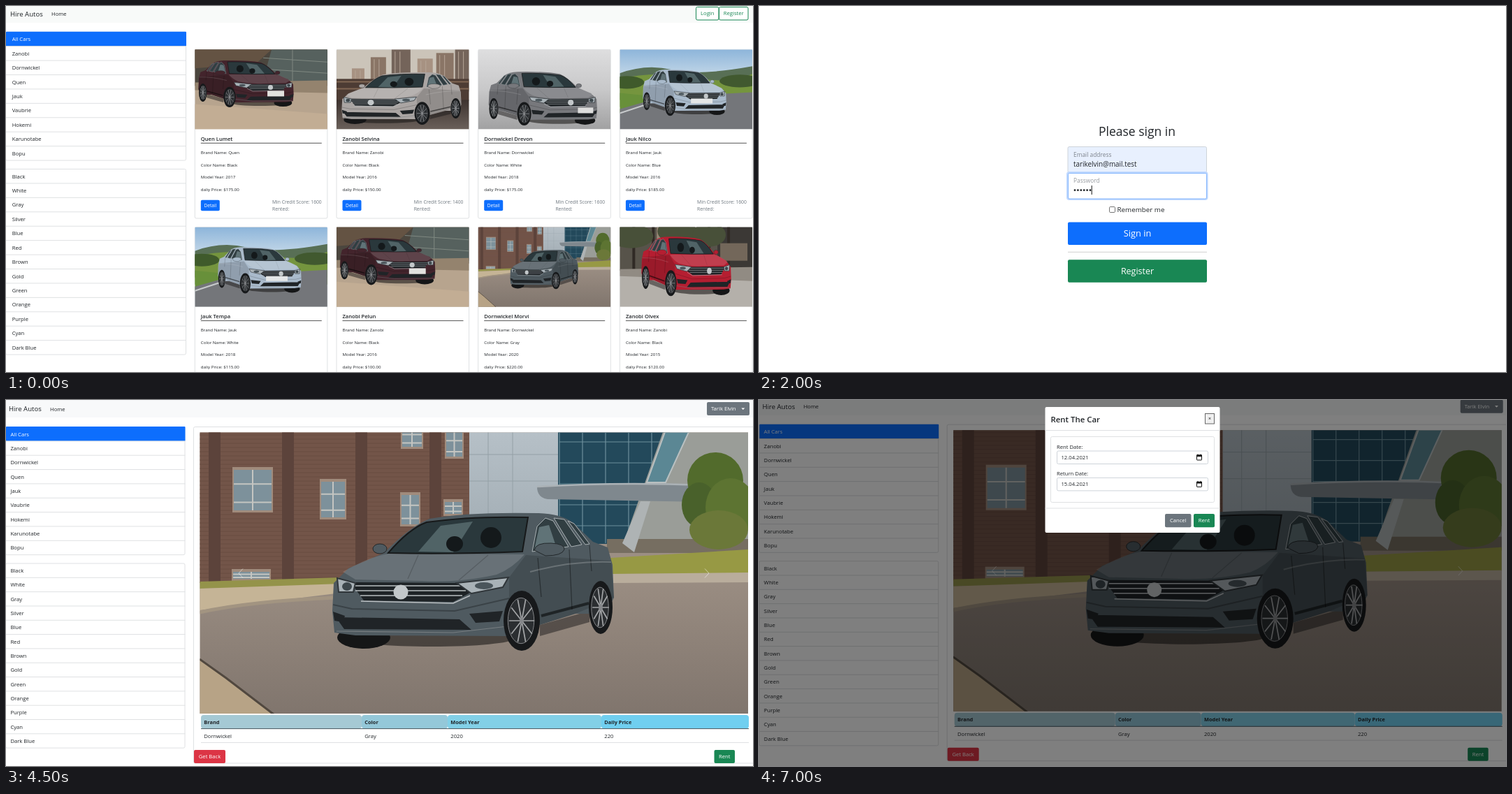
An HTML page for the animation above (8000 ms loop, 1069 by 524 pixels).

```html
<!DOCTYPE html>
<html lang="en">
<head>
<meta charset="utf-8">
<title>Car rental</title>
<style>
html, body { margin: 0; width: 100%; height: 100%; overflow: hidden; background: #fff; }
#stage { display: block; width: 1069px; height: 524px; }
text { font-family: "Open Sans", "Noto Sans", sans-serif; white-space: pre; }
</style>
</head>
<body>
<svg id="stage" viewBox="0 0 1069 524"></svg>
<script>
const INK = '#212529', BLUE = '#0d6efd', GREEN = '#198754', GRAY = '#6c757d', RED = '#dc3545', LINE = '#dfe1e3';
const BODY = 7.65;

const rect = (x, y, w, h, fill, r = 0, stroke = 'none') =>
  `<rect x="${x}" y="${y}" width="${w}" height="${h}" rx="${r}" fill="${fill}" stroke="${stroke}"/>`;
const text = (x, y, s, size = BODY, fill = INK, weight = 400, anchor = 'start') =>
  `<text x="${x}" y="${y}" font-size="${size}" fill="${fill}" font-weight="${weight}" text-anchor="${anchor}">${s}</text>`;
const poly = (points, fill, more = '') => `<polygon points="${points}" fill="${fill}" ${more}/>`;
const path = (d, stroke, width = 1, fill = 'none') =>
  `<path d="${d}" stroke="${stroke}" stroke-width="${width}" fill="${fill}"/>`;
const shape = (d, fill) => path(d, 'none', 0, fill);
const oval = (x, y, rx, ry, fill, more = '') =>
  `<ellipse cx="${x}" cy="${y}" rx="${rx}" ry="${ry}" fill="${fill}" ${more}/>`;
const rule = (x1, x2, y, color = LINE) => path(`M${x1} ${y}H${x2}`, color);
const button = (x, y, w, h, label, fill, size = BODY) =>
  rect(x, y, w, h, fill, 2) + text(x + w / 2, y + h / 2 + size * .36, label, size, '#fff', 400, 'middle');
const outline = (x, y, w, h, label) =>
  rect(x, y, w, h, '#fff', 2, GREEN) + text(x + w / 2, y + h / 2 + 2.7, label, BODY, GREEN, 400, 'middle');
const gradient = (id, ...colors) => `<linearGradient id="${id}" x2="0" y2="1">` +
  colors.map((c, i) => `<stop offset="${i / (colors.length - 1)}" stop-color="${c}"/>`).join('') + '</linearGradient>';

// ---- Pictures ----
function wheel(x, y, rx, ry) {
  let spokes = '';
  for (let i = 0; i < 10; i++) {
    const a = i * Math.PI / 5;
    spokes += `M${x} ${y}L${x + rx * .7 * Math.cos(a)} ${y + ry * .74 * Math.sin(a)}`;
  }
  return oval(x, y, rx, ry, '#17191b') +
    oval(x - 1, y, rx * .72, ry * .76, '#2b2e31', 'stroke="#85878a"') +
    path(spokes, '#a3a5a7', 1.7) + oval(x, y, 3, 5, '#85878a');
}

const carShape = oval(610, 342, 115, 11, '#1d1b1a', 'opacity=".6"') +
  poly('764,322 835,302 835,318 764,338', '#1d1b1a', 'opacity=".5"') +
  oval(512, 340, 38, 16, '#151617') +
  shape('M470 333L467 302L469 262L490 241L541 219Q578 181 606 170Q660 160 762 162Q795 163 812 176L840 203L861 211L868 236L870 283L858 306L815 306L764 322L720 338L500 337Z', 'currentColor') +
  shape('M482 246Q520 224 548 220L742 221Q725 241 702 250Q650 262 595 259L500 257Z', '#ffffff24') +
  path('M590 222L575 256M690 222L648 258', '#0000002a', 1.5) +
  shape('M720 254L744 222L866 230L870 283L815 306L764 322L720 338Z', '#00000026') +
  path('M547 219Q577 184 602 175Q665 166 747 168L739 217Q640 221 547 219Z', '#17191a', 2, '#2a383c') +
  poly('590,217 622,180 668,174 640,218', '#7f989a', 'opacity=".45"') +
  oval(694, 197, 15, 15, '#14191b') + oval(642, 206, 12, 11, '#14191b') +
  path('M753 217L760 181L772 169L783 173L805 210ZM784 169L799 171L824 207L809 210ZM804 173L813 177L835 206L829 207Z', '#a9b0b3', 1, '#313e42') +
  poly('756,214 763,182 777,179 788,212', '#8fa7ac', 'opacity=".5"') +
  oval(535, 213, 10, 7, 'currentColor', 'stroke="#22272a"') +
  path('M756 215Q758 204 780 205Q800 206 799 214Q796 223 772 223Z', '#22272a', 1, 'currentColor') +
  path('M761 226L766 282M806 214L810 300M835 208L838 245', '#00000066', 1.2) +
  path('M750 246Q810 230 866 232', '#ffffff33', 2) + path('M766 309L834 291', '#00000088', 4) +
  shape('M493 261L655 262L664 276L640 289L512 287Z', '#1e2326') +
  path('M497 266H650M500 273H658M507 280H653M508 288L640 291L664 280', '#b9bec1', 1.5) +
  path('M474 255L500 262L497 275L476 275ZM645 262L719 254L711 268L666 277Z', '#30363a', 2, '#a9b2b7') +
  oval(488, 267, 7, 6, '#3d474c') + oval(684, 266, 13, 5, '#4a555b') +
  path('M468 293L495 299L642 302L720 284', '#00000044', 2) +
  shape('M472 311L649 314L666 329L484 328ZM663 306L711 302L706 317L672 319ZM468 303L485 309L482 318L470 316Z', '#202427') +
  path('M473 331L640 333L718 324', '#777d80', 1.2) +
  oval(565, 275, 10.5, 10.5, '#c3c8ca') +
  wheel(738, 316, 26, 43) + wheel(851, 297, 17, 38);

const car = (color, x, y, w, h, flip) =>
  `<g color="${color}" transform="translate(${flip ? x + w : x} ${y}) scale(${(flip ? -w : w) / 404} ${h / 200}) translate(-466 -160)"><use href="#car"/></g>`;

function brickWindow([x, y, w, h]) {
  return rect(x - 2, y - 4, w + 4, h + 7, '#a08b7c') + rect(x, y, w, h, '#7d919b') +
    path(`M${x + w / 2} ${y}v${h}M${x} ${y + h * .35}h${w}M${x} ${y + h * .8}h${w}`, '#c4c5c1', 2);
}

function campus() {
  let bricks = '', panes = '';
  for (let y = 50; y < 256; y += 6) bricks += `M277 ${y}H662`;
  for (let x = 792; x < 945; x += 33) panes += `M${x} 46V205`;
  for (let y = 60; y < 205; y += 30) panes += `M792 ${y}H945`;
  return rect(277, 46, 786, 404, 'url(#asphalt)') +
    rect(277, 46, 386, 216, '#735549') + path(bricks, '#684c41', 1) +
    [290, 395, 500, 606].map(x => rect(x, 46, 17, 214, '#5c433b')).join('') +
    [[326, 100, 54, 58], [451, 117, 34, 51], [566, 136, 25, 42], [628, 146, 24, 17], [567, 40, 28, 27], [630, 46, 23, 35], [325, 246, 52, 10]].map(brickWindow).join('') +
    rect(663, 46, 130, 170, 'url(#metal)') + path('M690 46V165M725 46V165M663 78H790M663 116H790', '#94a0a6') +
    rect(790, 46, 160, 160, '#23495b') + path(panes, '#6d8f9c', 1.2) +
    poly('940,46 1063,46 1063,215 880,215', '#9a9d98') + poly('917,118 943,46 977,46 944,118', '#5b8794', 'stroke="#b9c0c1" stroke-width="2"') +
    rect(860, 199, 203, 20, '#766e61') + poly('882,205 908,145 922,145 899,218', '#aeb3b4') +
    shape('M760 124Q880 117 992 121Q1001 124 1000 146L775 142Q760 140 760 124Z', '#7f888e') + path('M760 124Q880 117 998 122', '#abb2b6', 2.5) +
    rect(1011, 145, 4, 67, '#4b4233') +
    [[1015, 115, 40, 40], [992, 150, 25, 32], [1037, 154, 36, 42], [1020, 186, 42, 28]].map(([x, y, a, b], i) => oval(x, y, a, b, ['#526b2c', '#49612b', '#5d7432', '#6b7839'][i])).join('') +
    poly('865,226 1063,214 1063,248 865,249', '#979944') + poly('277,260 480,254 480,265 277,270', '#94934a') +
    poly('277,270 480,263 480,276 277,301', '#c5b496') + poly('868,249 1063,247 1063,261 868,262', '#b9ad9c') +
    path('M277 304Q350 288 470 283', '#a29481', 5) +
    poly('277,371 315,398 383,450 277,450', '#b7a386') + path('M277 371L315 398L383 450', '#51483f', 3) +
    car('#4f5a60', 466, 160, 404, 200);
}

const focus = () => rect(0, 0, 190, 114, '#b7a48e') + rect(0, 0, 190, 52, '#4b463e') +
  poly('0,0 110,0 88,20 0,27', '#645343') + poly('110,0 190,0 190,48 98,43', '#56615e') +
  path('M98 12L190 18M98 28L190 34M140 0V45', '#7f8881', 1) + poly('0,47 190,44 190,62 0,58', '#94836e') +
  poly('0,78 190,92 190,114 0,114', '#c2ad94') +
  car('#43242c', 5, 15, 137, 68, true) + rect(104, 59, 24, 8, '#e2e2df');

const corolla = () => rect(0, 0, 190, 114, '#cbc4b9') +
  [[22, 27, 18], [49, 11, 22], [79, 0, 27], [116, 13, 22], [143, 5, 25], [170, 0, 20]].map(([x, y, w], i) =>
    rect(x, y, w, 60, ['#a79282', '#8a7566', '#74645a'][i % 3]) + path(`M${x + 5} ${y + 3}V58M${x + 12} ${y + 3}V58`, '#b5a596', 1)).join('') +
  rect(0, 42, 190, 31, '#4d3c34') + path('M0 46H190M0 56H190', '#806653', 2) +
  rect(0, 72, 190, 42, 'url(#street)') + car('#aaa5a3', 7, 32, 172, 76);

const passat = () => rect(0, 0, 190, 114, 'url(#studio)') + car('#77787c', 15, 31, 156, 78, true) + rect(143, 83, 22, 8, '#dddddc');

const astra = () => rect(0, 0, 190, 114, 'url(#sky)') +
  shape('M0 34Q38 20 75 29T190 24V72H0Z', '#586f55') + shape('M0 42Q50 30 105 40T190 35V82H0Z', '#75953e') +
  oval(10, 47, 25, 9, '#3f5a2b') + oval(172, 45, 29, 9, '#41592f') +
  poly('0,62 70,69 0,91', '#68903a') + poly('0,85 60,68 190,61 190,114 0,114', '#74767a') +
  path('M0 91L64 70', '#c8cbcc', 2) + car('#a9bacb', 33, 28, 120, 67, true) + rect(102, 70, 31, 7, '#e4e6e7');

const auris = () => rect(0, 0, 190, 114, '#b4b0aa') + rect(0, 0, 190, 62, '#57534a') +
  rect(53, 0, 47, 47, '#978775') + rect(140, 0, 50, 61, '#3b3835') +
  path('M20 0V60M48 0V57M128 0V52M156 0V62', '#302a25', 4) +
  [[16, 13, 32], [82, 6, 28], [128, 11, 24]].map(([x, y, r]) => oval(x, y, r, 17, '#485039')).join('') +
  rect(144, 23, 39, 25, '#73675a') + poly('0,60 190,57 190,77 0,70', '#918b83') +
  car('#b51e31', 31, 13, 129, 86, true);

const picture = (id, x, y, w, h) =>
  `<svg x="${x}" y="${y}" width="${w}" height="${h}" viewBox="${id === 'campus' ? '277.5 46.5 784.5 402.5' : '0 0 190 114'}" preserveAspectRatio="none"><use href="#${id}"/></svg>`;

// ---- Pages ----
const OWNER = 'Tarik Elvin', EMAIL = 'tarikelvin@mail.test', SHOP = 'Hire Autos';
const [ZANOBI, DORN, QUEN, JAUK] = ['Zanobi', 'Dornwickel', 'Quen', 'Jauk'];
const brands = ['All Cars', ZANOBI, DORN, QUEN, JAUK, 'Vaubrie', 'Hokemi', 'Karunotabe', 'Bopu'];
const colors = 'Black,White,Gray,Silver,Blue,Red,Brown,Gold,Green,Orange,Purple,Cyan,Dark Blue'.split(',');
const cars = [
  [QUEN, 'Lumet', 'Black', 2017, 175, 1600, 'focus'],
  [ZANOBI, 'Selvina', 'Black', 2016, 150, 1400, 'corolla'],
  [DORN, 'Drevon', 'White', 2018, 175, 1600, 'passat'],
  [JAUK, 'Nilco', 'Blue', 2016, 185, 1600, 'astra'],
  [JAUK, 'Tempa', 'White', 2018, 115, 1500, 'astra'],
  [ZANOBI, 'Pelun', 'Black', 2016, 100, 1400, 'focus'],
  [DORN, 'Morvi', 'Gray', 2020, 220, 1700, 'campus'],
  [ZANOBI, 'Olvex', 'Black', 2015, 120, 1400, 'auris']
];

function list(items, x, y, right, pitch, active) {
  return rect(-.5, y, right, items.length * pitch, '#fff', 2, LINE) + items.map((s, i) => {
    const top = y + i * pitch, on = active && !i;
    return (on ? rect(0, top - .5, right, pitch + .7, BLUE, 1) : i ? rule(0, right, top) : '') +
      text(x, top + pitch / 2 + 2.9, s, BODY, on ? '#fff' : INK);
  }).join('');
}

function card([brand, model, color, year, price, score, image], i) {
  const x = 270.3 + i % 4 * 202.7, y = 62.3 + (i > 3) * 254.3;
  const rows = [`Brand Name: ${brand}`, `Color Name: ${color}`, `Model Year: ${year}`, `daliy Price: $${price}.00`];
  return rect(x, y, 189.6, 241.7, '#fff', 2, LINE) + picture(image, x, y, 189.6, 114.2) +
    text(x + 8.5, y + 130.7, `${brand} ${model}`, 7.6, INK, 600) + rule(x + 8.5, x + 181.5, y + 134, '#555') +
    rows.map((s, n) => text(x + 8.5, y + 149.6 + n * 17.6, s, 6.15)).join('') +
    button(x + 8.5, y + 215.5, 27, 15.5, 'Detail', BLUE, 6.6) +
    text(x + 110.7, y + 220.6, `Min Credit Score: ${score}`, 6.75, GRAY) + text(x + 110.7, y + 230.6, 'Rented:', 6.75, GRAY);
}

const catalogue = () => rect(0, 0, 1069, 24, '#f8faf9') + text(6, 14.7, SHOP, 9.6) + text(65, 14, 'Home') +
  outline(987.5, 1.5, 32.5, 18.5, 'Login') + outline(1020.5, 1.5, 41.5, 18.5, 'Register') +
  list(brands, 8.7, 37.2, 258, 20.43, true) + list(colors, 8.7, 233.5, 258, 20.43) + cars.map(card).join('');

function signIn() {
  let dots = '';
  for (let i = 0; i < 6; i++) dots += oval(452 + i * 4.4, 263.7, 1.4, 1.4, INK);
  return text(541, 186.3, 'Please sign in', 17.5, INK, 400, 'middle') +
    rect(442, 201.5, 198.5, 37, '#e8f0fe', 2, '#ced4da') + text(450, 215.6, 'Email address', 8.4, '#7d838b') +
    text(450, 229.7, EMAIL, 9.9) +
    rect(440, 237, 202.5, 41, '#bfd8fe', 4) + rect(442.5, 239.5, 198, 36.5, '#fff', 2, '#86b7fe') +
    text(450, 253.2, 'Password', 8.4, '#979ba0') + dots + path('M476.2 257V270', '#111') +
    rect(501.5, 287.5, 8, 8, '#fff', 1.3, '#767676') + text(512.5, 295.4, 'Remember me', 9.8) +
    button(442, 309.5, 199, 32.5, 'Sign in', BLUE, 12.8) + rule(442, 641, 352.3, '#cfcfcf') +
    button(442, 363.3, 199, 32.5, 'Register', GREEN, 12.5);
}

function details() {
  const columns = [[279, 230, '#a5c9d4', 'Brand', DORN], [509, 123, '#94c8d9', 'Color', 'Gray'],
    [632, 220, '#82d0e7', 'Model Year', 2020], [852, 211, '#70cff0', 'Daily Price', 220]];
  return rect(-2, -2, 1073, 27, '#f8f9fa') + text(4, 16, SHOP, 9.6) + text(63, 15.6, 'Home') +
    rect(1003, 3, 61, 19, GRAY, 2) + text(1009, 15.3, OWNER, BODY, '#fff') + poly('1052.3,11.4 1057.3,11.4 1054.8,14', '#fff') +
    list(brands, 6.4, 38.5, 256.5, 20.35, true) + list(colors, 6.4, 234, 256.5, 20.32) +
    rect(268.5, 38.5, 803, 481.5, '#fff', 2, LINE) + picture('campus', 277.5, 46.5, 784.5, 402.5) +
    path('M339 241.5L333 248L339 254.5M1000 241.5L1006 248L1000 254.5', '#ffffff80') +
    columns.map(([x, w, fill, head, value]) => rect(x, 451, w, 19.5, fill, 4) +
      text(x + 4.3, 463.8, head, 7.4, INK, 700) + text(x + 4.3, 484, value)).join('') +
    rule(279, 1063, 470.6, '#45565e') + rule(279, 1063, 490.5) +
    button(269, 501, 45, 19, 'Get Back', RED) + button(1013.5, 501, 29.5, 19, 'Rent', GREEN);
}

function dateField(label, value, y) {
  return text(426, y, label) + rect(426.5, y + 3, 216, 18.5, '#fff', 2, '#ced4da') + text(432.5, y + 15, value) +
    rect(626.5, y + 9, 7, 7, '#fff', .5, '#111') + rect(626, y + 8.5, 8, 2.6, '#111') +
    path(`M628 ${y + 7.5}v2M632 ${y + 7.5}v2`, '#111');
}

const booking = () => `<g transform="translate(.7 -3.3)">${details()}</g>` + rect(0, 0, 1069, 524, '#00000080') +
  rect(409.5, 10, 250, 180, '#fff', 2) + text(417.5, 31.7, 'Rent The Car', 11.4, INK, 600) +
  rect(638.5, 19.5, 13, 14.5, '#efefef', 0, '#666') + text(645, 29.2, '×', 7, '#111', 400, 'middle') +
  rule(409.5, 659.5, 43.5) + rect(417.5, 52.5, 234, 94, '#fff', 2, LINE) +
  dateField('Rent Date:', '12.04.2021', 70) + dateField('Return Date:', '15.04.2021', 108.4) +
  rule(409.5, 659.5, 155) + button(581, 163, 37.5, 19.3, 'Cancel', GRAY) + button(622, 163, 30, 19.3, 'Rent', GREEN);

// ---- Playback ----
const stage = document.getElementById('stage');
const define = (id, content) => `<g id="${id}">${content}</g>`;
const defs = '<defs>' + gradient('asphalt', '#a09286', '#9b8e83', '#80756d') + gradient('metal', '#b6c0c7', '#a0abb2') +
  gradient('studio', '#dededf', '#c8c8c9', '#a1a1a2') + gradient('sky', '#8db5da', '#dfe9ef', '#e4ecee') +
  gradient('street', '#3d332f', '#6a605a') + define('car', carShape) +
  Object.entries({ campus, focus, corolla, passat, astra, auris }).map(([id, draw]) => define(id, draw())).join('') + '</defs>';
const pages = [[0, catalogue], [500, signIn], [3000, details], [5500, booking]];
stage.innerHTML = defs + pages.map(([, draw]) => `<g class="page" display="none">${draw()}</g>`).join('');
const groups = [...stage.querySelectorAll('.page')];

function show() {
  const time = performance.now() % 8000;
  const current = pages.filter(([start]) => time >= start).length - 1;
  groups.forEach((group, i) => group.setAttribute('display', i === current ? 'inline' : 'none'));
  requestAnimationFrame(show);
}
show();
</script>
</body>
</html>
```
